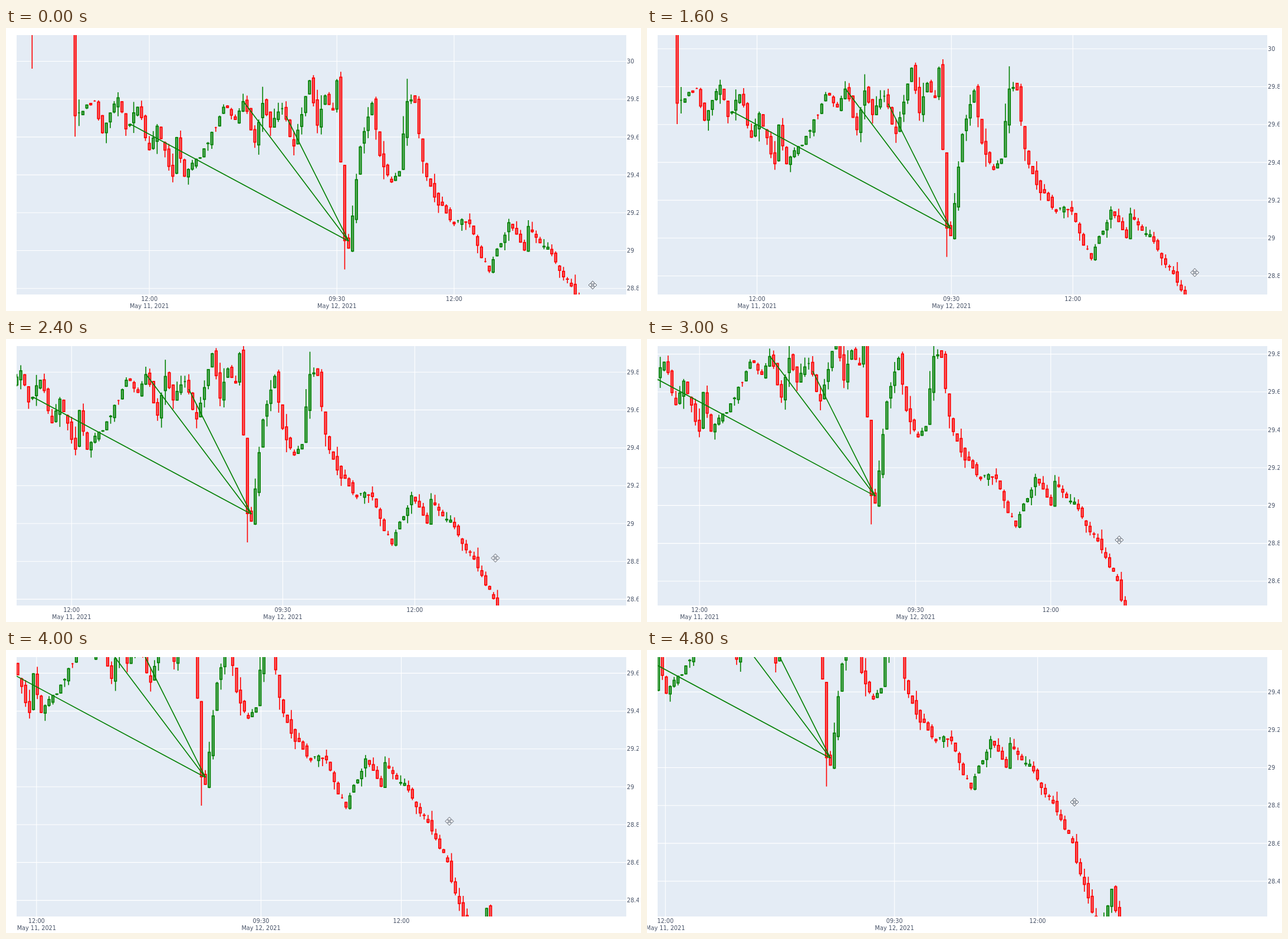
Write an HTML page with a canvas that moves like this. It is 1077 px wide and 480 px high and loops after 5 s.

```html
<!DOCTYPE html>
<html lang="en">
<head>
<meta charset="utf-8">
<title>Candlestick chart being panned</title>
<style>
  html, body { margin: 0; width: 100%; height: 100%; overflow: hidden; background: #fff; }
  canvas { display: block; }
</style>
</head>
<body>
<canvas id="chart" width="1077" height="480"></canvas>
<script>
const ctx = document.getElementById('chart').getContext('2d');
const LOOP = 5000, STEP = 200;
const plot = { left: 18, top: 12, right: 1052, bottom: 452 };
const UP = '#008000', DOWN = '#ff0000', INK = '#465166';
const FIRST = 8, LAST = 155;

const xOf = index => 44.3 + 6.627 * index;      // one candle per five minutes
const yOf = price => 56.5 + (30 - price) * 321;

// Main turns of the market: candle index, closing price.
const turns = [
  [8, 30.15], [10, 30.22], [11, 29.71], [16, 29.79], [18, 29.62], [22, 29.81], [24, 29.64],
  [27, 29.76], [30, 29.53], [32, 29.66], [36, 29.39], [37, 29.6], [39, 29.39], [45, 29.57],
  [49, 29.76], [52, 29.69], [54, 29.79], [57, 29.57], [59, 29.78], [61, 29.65], [64, 29.75],
  [67, 29.55], [71, 29.9], [73, 29.66], [75, 29.82], [77, 29.74], [78, 29.9], [80, 29.05],
  [81, 29.01], [84, 29.55], [87, 29.78], [89, 29.5], [92, 29.36], [94, 29.42], [96, 29.79],
  [98, 29.78], [100, 29.47], [103, 29.28], [107, 29.16], [112, 29.14], [115, 28.96], [117, 28.89],
  [122, 29.15], [126, 29], [127, 29.13], [133, 28.98], [138, 28.81], [142, 28.65], [146, 28.38],
  [150, 28.1], [153, 28.36], [155, 28.15]
];

// Panning: time, distance left, distance up.
const drag = [
  [0, 0, 0], [200, 46, 17], [800, 46, 17], [1000, 54, 19.5], [1600, 66, 21.2],
  [2400, 165, 64.5], [3400, 213.5, 115.5], [4000, 243, 145.5], [4800, 270, 178]
];

const trendEnd = [81, 29.05];
const trendStarts = [[25, 29.67], [54, 29.79], [65, 29.71]];
const ticks = [[30, '12:00', 'May 11, 2021'], [78, '09:30', 'May 12, 2021'], [108, '12:00', '']];

// Linear interpolation through rows whose first column is the position.
function sample(rows, at) {
  const n = Math.max(1, rows.findIndex(row => row[0] >= at));
  const a = rows[n - 1], b = rows[n], u = (at - a[0]) / (b[0] - a[0]);
  return a.map((v, k) => v + (b[k] - v) * u);
}

function random(index, channel) {
  const v = Math.sin(index * 12.9898 + channel * 78.233) * 43758.5453;
  return v - Math.floor(v);
}

function makeCandles() {
  const candles = [];
  let previous = 30.25, previousBody = 0;
  for (let i = FIRST; i <= LAST; i++) {
    const isTurn = turns.some(turn => turn[0] === i);
    const close = sample(turns, i)[1] + (isTurn ? 0 : (random(i, 1) - 0.5) * 0.04);
    const open = previous + (random(i, 2) - 0.5) * 0.05;
    const body = Math.abs(close - open);
    const reach = 0.03 + 0.45 * Math.max(body, previousBody);
    const top = yOf(Math.max(open, close)), bottom = yOf(Math.min(open, close));
    candles.push({
      x: xOf(i), top, bottom,
      high: top - 321 * reach * random(i, 3) ** 3,
      low: bottom + 321 * reach * random(i, 4) ** 3,
      color: close < open ? DOWN : UP
    });
    previous = close;
    previousBody = body;
  }
  return candles;
}
const candles = makeCandles();

// Once the overnight break enters at the left, the time ticks spread from the right edge.
function tickX(x, pan) {
  const free = Math.min(pan, 26);
  x -= free;
  return x - (pan - free) * (1057 - x) * 0.000907;
}

function line(x1, y1, x2, y2, color, width) {
  ctx.strokeStyle = color;
  ctx.lineWidth = width;
  ctx.beginPath();
  ctx.moveTo(x1, y1);
  ctx.lineTo(x2, y2);
  ctx.stroke();
}

function drawCandle({ x, top, bottom, high, low, color }) {
  line(x, high, x, low, color, 1.6);
  const inset = Math.min(0.9, (bottom - top) / 2);
  const box = [x - 1.7, top + inset, 3.4, bottom - top - 2 * inset];
  ctx.fillStyle = color === UP ? '#72b67a' : '#f2767b';
  ctx.fillRect(...box);
  ctx.lineWidth = 1.8;
  ctx.strokeRect(...box);
}

function drawPointer(x, y) {
  ctx.save();
  ctx.translate(x, y);
  ctx.fillStyle = '#f4f6fa';
  ctx.strokeStyle = '#444b55';
  ctx.lineWidth = 0.9;
  for (let k = 0; k < 4; k++) {
    ctx.beginPath();
    ctx.moveTo(0, -7);
    ctx.lineTo(3, -4);
    ctx.lineTo(0, -1);
    ctx.lineTo(-3, -4);
    ctx.closePath();
    ctx.fill();
    ctx.stroke();
    ctx.rotate(Math.PI / 2);
  }
  ctx.restore();
}

function clipTo(x, y, width, height) {
  ctx.beginPath();
  ctx.rect(x, y, width, height);
  ctx.clip();
}

function drawPriceAxis(panY) {
  ctx.save();
  clipTo(0, 0, 1073, 480);
  ctx.textAlign = 'left';
  for (let tenths = 300; tenths >= 282; tenths -= 2) {
    const y = yOf(tenths / 10) - panY;
    if (y < plot.top || y > plot.bottom) continue;
    line(plot.left, y, plot.right, y, '#fff', 1.1);
    ctx.fillStyle = INK;
    ctx.fillText(String(tenths / 10), 1053, y + 3.6);
  }
  ctx.restore();
}

function drawTimeAxis(panX) {
  ctx.textAlign = 'center';
  ctx.fillStyle = INK;
  for (const [index, time, day] of ticks) {
    const x = tickX(xOf(index), panX);
    line(x, plot.top, x, plot.bottom, '#fff', 1.1);
    ctx.fillText(time, x, 462.7);
    ctx.fillText(day, x, 475);
  }
}

function draw(t) {
  const [, panX, panY] = sample(drag, t);
  const width = plot.right - plot.left, height = plot.bottom - plot.top;
  ctx.fillStyle = '#fff';
  ctx.fillRect(0, 0, 1077, 480);
  ctx.fillStyle = '#e4ecf5';
  ctx.fillRect(plot.left, plot.top, width, height);
  ctx.font = '9.7px "DejaVu Sans", Verdana, sans-serif';
  drawPriceAxis(panY);
  drawTimeAxis(panX);

  ctx.save();
  clipTo(plot.left, plot.top, width, height);
  ctx.translate(-panX, -panY);
  line(xOf(0), 0, xOf(0), 69, DOWN, 1.6);
  candles.forEach(drawCandle);
  for (const [index, price] of trendStarts) {
    line(xOf(index), yOf(price), xOf(trendEnd[0]), yOf(trendEnd[1]), UP, 1.6);
  }
  ctx.restore();

  drawPointer(995 - panX, 436 - panY);
}

function frame() {
  const t = performance.now() % LOOP;
  draw(Math.floor(t / STEP) * STEP);
  requestAnimationFrame(frame);
}
frame();
</script>
</body>
</html>
```
